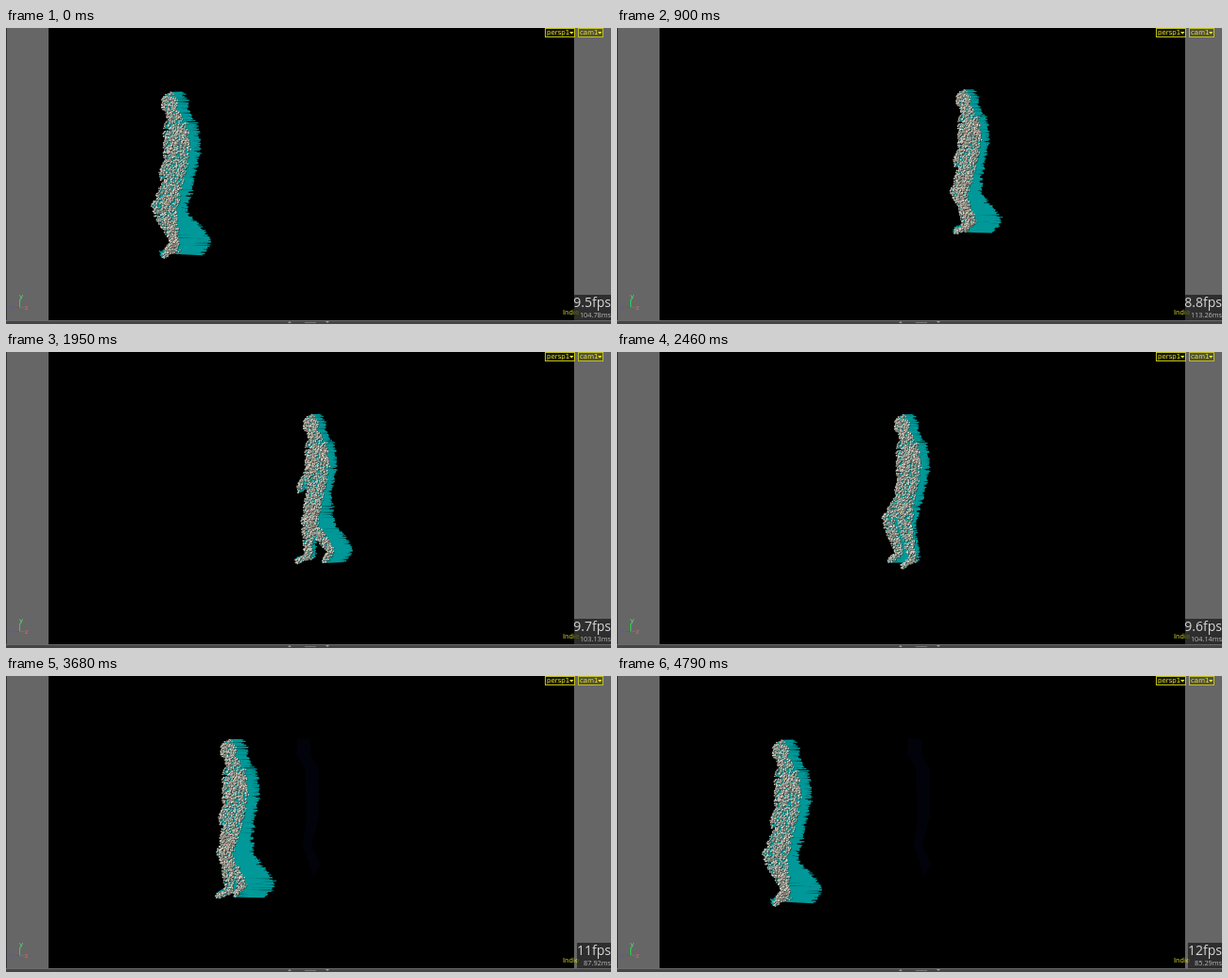
Animation, 640 px wide and 314 px high, one loop 4.81 s. Source, as an HTML page with a canvas:

```html
<!DOCTYPE html>
<html lang="en">
<head>
<meta charset="utf-8">
<title>Walking point cloud</title>
<style>
html, body { margin: 0; width: 640px; height: 314px; overflow: hidden; background: #000; }
canvas { display: block; }
</style>
</head>
<body>
<canvas id="stage" width="640" height="314"></canvas>
<script>
const ctx = document.getElementById('stage').getContext('2d');
const { PI, sin, cos } = Math;
const LOOP = 4810, FIRST = 150, FINAL = 4789;
const TEAL = '#009898';
const TONES = ['#f0e8dc', '#dfd4c6', '#c8bcae', '#aca195', '#e4c9b8'];

// The viewport redraws in bursts at a steady pitch, with short stalls between.
const BURSTS = [FIRST, 500, 730, 1130, 1560, 2150, 2760, 2970, 3490, 4070, 4605];
const PITCH = 92, STALL = 75;

// Redraw cost at a few moments: [time, ms]
const COST = [[0, 104.78], [500, 121.1], [1314, 101.27], [1928, 103.13],
  [2970, 105.24], [3674, 87.92], [FINAL, 85.29]];

const mix = (a, b, t) => a + (b - a) * t;

function lastRedraw(time) {
  const i = BURSTS.filter(b => b <= time).length - 1;
  if (i < 0) return 0;
  const next = BURSTS[i + 1] || LOOP + FIRST;
  const most = Math.floor((next - BURSTS[i] - STALL) / PITCH);
  return BURSTS[i] + PITCH * Math.min(most, Math.floor((time - BURSTS[i]) / PITCH));
}

function costAt(time) {
  const i = Math.max(1, COST.findIndex(c => c[0] >= time));
  const [t0, a] = COST[i - 1], [t1, b] = COST[i];
  return mix(a, b, (time - t0) / (t1 - t0));
}

function makeRandom(seed) {
  return () => {
    seed = (seed * 1664525 + 1013904223) >>> 0;
    return seed / 4294967296;
  };
}

// Two-harmonic cycle, returned in radians from coefficients in degrees.
function cycle(u, mean, c1, s1, c2, s2) {
  const v = PI * u;
  return (mean + c1 * cos(v) + s1 * sin(v) + c2 * cos(2 * v) + s2 * sin(2 * v)) * PI / 180;
}

// Body at a moment, as tapered capsules: [ax, ay, ra, bx, by, rb, density].
function skeleton(time) {
  const x = (time - 500) / 4290;
  const headX = 380 - 207 * x + 13 * sin(PI * x) - 1.8 * sin(3 * PI * x);
  const phase = 0.18 + 3.37 * x - 0.095 * sin(PI * x) + 0.165 * sin(2 * PI * x);
  const top = 65 + 2.5 * x;
  const s = (150 + 24 * x) / 100;
  const parts = [];

  const bone = (a, ra, b, rb, density = 1) => parts.push([
    headX + a[0] * s, top + a[1] * s, ra * s,
    headX + b[0] * s, top + b[1] * s, rb * s, density
  ]);
  const reach = (p, angle, length) => [p[0] - sin(angle) * length, p[1] + cos(angle) * length];
  const arm = (shoulder, hand) => {
    const elbow = [mix(shoulder[0], hand[0], 0.5) + 2.5, mix(shoulder[1], hand[1], 0.5) + 1];
    bone(shoulder, 3.3, elbow, 2.7);
    bone(elbow, 2.7, hand, 1.9);
  };
  const leg = u => {
    const hip = [2.8, 53];
    const thigh = cycle(u, 10, 23, -6.8, -6.4, -5.5);
    const shin = cycle(u, -15.5, 16, 11.6, 4.2, -1.5);
    const knee = reach(hip, thigh, 21), ankle = reach(knee, shin, 20.5);
    const sole = shin + 1.2;
    const heel = reach(reach(ankle, shin, 1.5), sole, -1.2);
    bone(hip, 6.2, knee, 4.5);
    bone(knee, 4.5, ankle, 3, 1.3);
    bone(heel, 2.8, reach(heel, sole, 10), 1.7, 1.7);
  };

  const swing = cos(PI * phase);
  arm([8, 20], [7.5, 51]);
  leg(phase + 1);
  leg(phase);
  bone([0.2, 5.2], 5.1, [-0.3, 9.2], 4.6, 2.2);
  bone([1.6, 12], 3.3, [3, 17], 5, 1.6);
  bone([3.4, 21.5], 7.4, [3, 37], 6.8);
  bone([3, 37], 6.8, [2.8, 52], 6.7);
  arm([3, 21], [-7 + 5.5 * swing, 52.5 + 2 * swing]);
  return parts;
}

function scatter() {
  const rnd = makeRandom(71);
  const cloud = [];
  skeleton(FINAL).forEach(([ax, ay, ra, bx, by, rb, density], part) => {
    const area = (Math.hypot(bx - ax, by - ay) + ra) * (ra + rb);
    for (let n = area * density * 0.38; n > 0; n--) {
      const angle = rnd() * PI * 2, q = Math.pow(rnd(), 0.4);
      cloud.push({
        part, t: rnd(), ox: cos(angle) * q, oy: sin(angle) * q,
        length: 0.72 + rnd() * 0.12, buried: rnd() < 0.35,
        tone: TONES[Math.floor(rnd() * TONES.length)]
      });
    }
  });
  return cloud;
}
const cloud = scatter();

function place(p, parts) {
  const b = parts[p.part];
  const r = mix(b[2], b[5], p.t);
  return [mix(b[0], b[3], p.t) + p.ox * r, mix(b[1], b[4], p.t) + p.oy * r];
}

function rect(color, x, y, w, h) {
  ctx.fillStyle = color;
  ctx.fillRect(x, y, w, h);
}

function text(str, x, y, size, color, family = 'DejaVu Sans', align = 'left') {
  ctx.font = `${size}px "${family}", sans-serif`;
  ctx.textAlign = align;
  ctx.fillStyle = color;
  ctx.fillText(str, x, y);
}

function shape(color, ...points) {
  ctx.fillStyle = color;
  ctx.beginPath();
  points.forEach(([x, y]) => ctx.lineTo(x, y));
  ctx.fill();
}

function dot(p, [x, y]) {
  rect('rgba(16,18,16,.5)', x - 0.3, y - 0.3, 1.6, 1.6);
  rect(p.tone, x - 0.7, y - 0.7, 1.4, 1.4);
}

// Each point trails a streak opposite to its velocity.
function drawFigure(time) {
  const now = skeleton(time), before = skeleton(time - 145), after = skeleton(time + 145);
  const spots = cloud.map(p => place(p, now));
  cloud.forEach((p, i) => p.buried && dot(p, spots[i]));

  ctx.strokeStyle = TEAL;
  ctx.lineWidth = 1.1;
  ctx.beginPath();
  cloud.forEach((p, i) => {
    const [x, y] = spots[i], a = place(p, before), b = place(p, after);
    ctx.moveTo(x, y);
    ctx.lineTo(x + (a[0] - b[0]) * p.length, y + (a[1] - b[1]) * p.length);
  });
  ctx.stroke();
  cloud.forEach((p, i) => p.buried || dot(p, spots[i]));
}

function drawGhost() {
  shape('#02020b', [308, 66], [322, 67], [323, 85], [331, 98], [331, 150], [323, 180],
    [333, 200], [325, 213], [314, 180], [318, 150], [316, 98], [307, 84]);
}

function drawMenu(label, x, w) {
  rect('rgba(50,50,0,.4)', x, 0, w, 10);
  ctx.strokeStyle = '#c0c020';
  ctx.lineWidth = 1;
  ctx.strokeRect(x + 0.5, 0.5, w - 1, 9);
  text(label, x + 2, 7, 7, '#e6e632');
  shape('#e6e632', [x + w - 6, 4], [x + w - 1.5, 4], [x + w - 3.7, 6.5]);
}

function drawAxes() {
  rect('#35cc55', 14, 288, 1, 9);
  rect('#d04848', 14, 296, 6, 1);
  rect('#4c56c8', 9, 296, 5, 1);
  text('y', 14, 287, 7, '#48ef70');
  text('z', 20, 299, 6.5, '#ee6464');
  text('x', 4, 298, 6, '#5058b8');
}

function drawFrame() {
  rect('#666', 0, 0, 45, 310);
  rect('#666', 601, 0, 39, 310);
  rect('#333', 0, 0, 1, 310);
  rect('#454545', 0, 310, 640, 4);
  rect('#6a6a6a', 0, 310, 640, 1);
  rect('#777', 316, 312, 12, 1);
  shape('#999', [298, 313], [302, 313], [300, 311]);
  shape('#999', [338, 311], [342, 311], [340, 313]);
  drawMenu('persp1', 570, 32);
  drawMenu('cam1', 605, 27);
  drawAxes();
}

function drawStats(ms) {
  const fps = 1000 / ms;
  const short = fps >= 9.95;
  const left = short ? 604 : 601;
  text('Indie', 589, 304, 7, '#dcdc28');
  rect('rgba(0,0,0,.55)', left, 283, 640 - left, 27);
  text(fps.toFixed(short ? 0 : 1) + 'fps', 640, 296, 14, '#d6d6d6', 'Open Sans', 'right');
  text(ms.toFixed(2) + 'ms', 640, 307, 7.3, '#b9b9b9', 'Open Sans', 'right');
}

function draw(time) {
  rect('#000', 0, 0, 640, 314);
  if (time >= 2970) drawGhost();
  drawFigure(time || FINAL);
  drawFrame();
  drawStats(costAt(time));
}

let shown = -1;
const start = performance.now();
function loop() {
  const time = lastRedraw(Math.max(0, performance.now() - start) % LOOP);
  if (time !== shown) draw(shown = time);
  requestAnimationFrame(loop);
}
loop();
</script>
</body>
</html>
```
